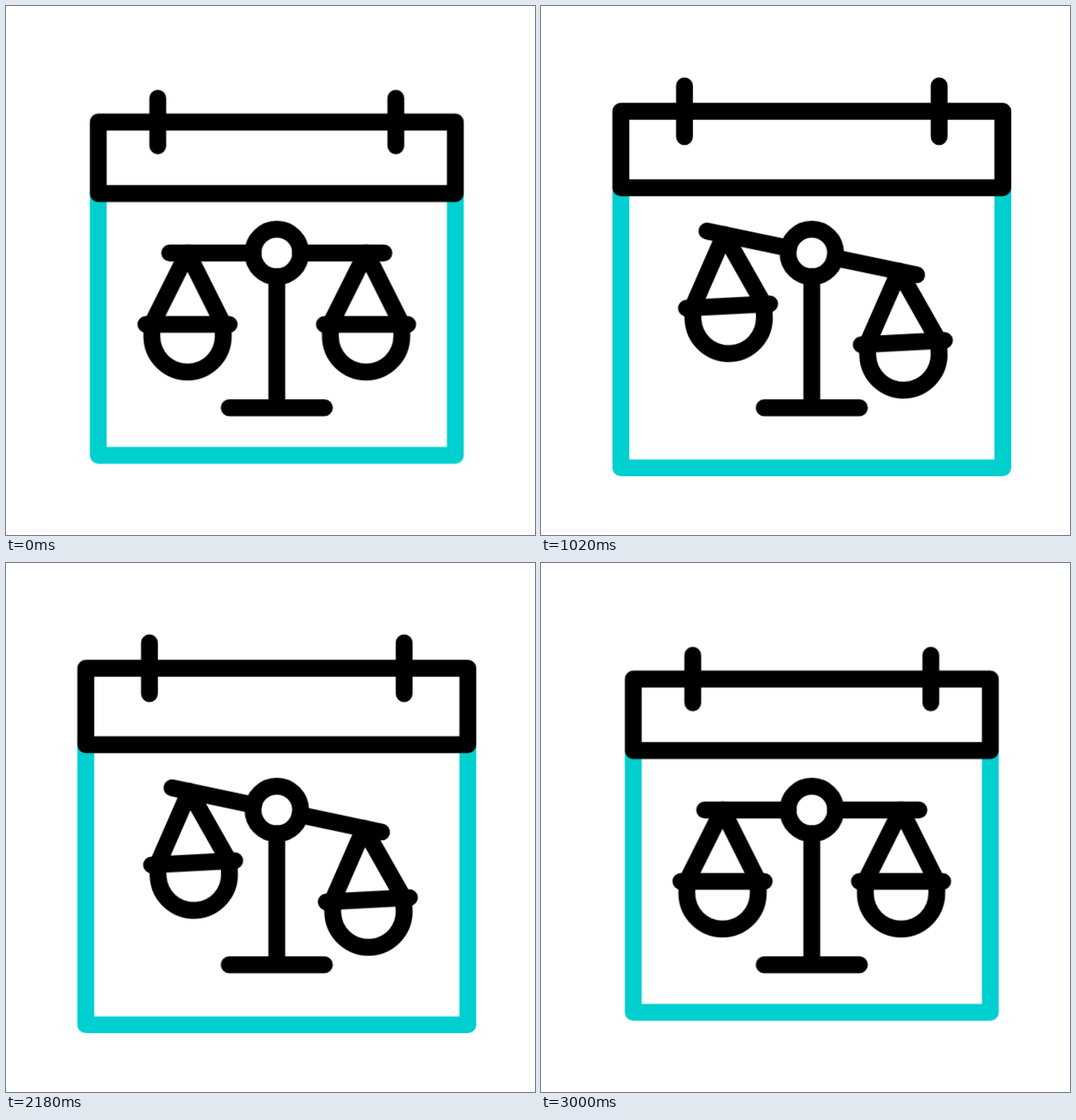
Animation of 640 by 640 pixels, one loop 3.22 s. Source, as an HTML page:

```html
<!DOCTYPE html>
<html lang="en">
<head>
<meta charset="utf-8">
<title>Calendar with scales</title>
<style>
  html, body { margin: 0; width: 100%; height: 100%; overflow: hidden; background: #fff; }
  svg { display: block; width: 100vw; height: 100vh; }
  .ink {
    fill: none; stroke: #000; stroke-width: 20.4;
    stroke-linecap: round; stroke-linejoin: round;
  }
  .teal { stroke: #00cfcf; }

  .calendar, .beam, .pan {
    transform-origin: 0 0;
    animation: 3220ms linear infinite;
  }
  .calendar { animation-name: swell; }
  .calendar path { vector-effect: non-scaling-stroke; }
  .beam { animation-name: tilt; }
  .pan { animation-name: swing; }

  /* Short moves at both ends, long sharper swings between them */
  @keyframes swell {
    0%, 6.2112% { transform: scale(1); animation-timing-function: cubic-bezier(.333, 0, .667, 1); }
    21.7391% { transform: scale(1.08); animation-timing-function: cubic-bezier(.587, 0, .413, 1); }
    49.6894% { transform: scale(1.03); animation-timing-function: cubic-bezier(.587, 0, .413, 1); }
    77.6398% { transform: scale(1.08); animation-timing-function: cubic-bezier(.333, 0, .667, 1); }
    93.1677%, 100% { transform: scale(1); }
  }
  @keyframes tilt {
    0%, 6.2112% { transform: rotate(0deg); animation-timing-function: cubic-bezier(.333, 0, .667, 1); }
    21.7391% { transform: rotate(20deg); animation-timing-function: cubic-bezier(.587, 0, .413, 1); }
    49.6894% { transform: rotate(-20deg); animation-timing-function: cubic-bezier(.587, 0, .413, 1); }
    77.6398% { transform: rotate(20deg); animation-timing-function: cubic-bezier(.333, 0, .667, 1); }
    93.1677%, 100% { transform: rotate(0deg); }
  }
  /* Cancels the beam's tilt and leans 5 degrees the other way */
  @keyframes swing {
    0%, 6.2112% { transform: rotate(0deg); animation-timing-function: cubic-bezier(.333, 0, .667, 1); }
    21.7391% { transform: rotate(-25deg); animation-timing-function: cubic-bezier(.587, 0, .413, 1); }
    49.6894% { transform: rotate(25deg); animation-timing-function: cubic-bezier(.587, 0, .413, 1); }
    77.6398% { transform: rotate(-25deg); animation-timing-function: cubic-bezier(.333, 0, .667, 1); }
    93.1677%, 100% { transform: rotate(0deg); }
  }
</style>
</head>
<body>
<svg viewBox="0 0 640 640" class="ink">
  <g transform="translate(327.6 327.6)">
    <g class="calendar">
      <path class="teal" d="M-216 -100.8V216H216V-100.8"/>
      <path d="M-216 -187.2H216V-100.8H-216Z"/>
      <path d="M-144 -216V-158.4M144 -216V-158.4"/>
    </g>
  </g>

  <g transform="translate(327.6 298.8)">
    <path d="M0 28.8V187.2M-57.6 187.2H57.6"/>
    <circle r="28.8"/>
    <g class="beam">
      <path d="M-129.6 0H-28.8M28.8 0H129.6"/>
      <g transform="translate(-108 0)">
        <g class="pan">
          <path d="M-43.2 86.4L0 0L43.2 86.4M-50.4 86.4H50.4"/>
          <path d="M-43.2 86.4V100.8A43.2 43.2 0 0 0 43.2 100.8V86.4"/>
        </g>
      </g>
      <g transform="translate(108 0)">
        <g class="pan">
          <path d="M-43.2 86.4L0 0L43.2 86.4M-50.4 86.4H50.4"/>
          <path d="M-43.2 86.4V100.8A43.2 43.2 0 0 0 43.2 100.8V86.4"/>
        </g>
      </g>
    </g>
  </g>
</svg>
</body>
</html>
```
